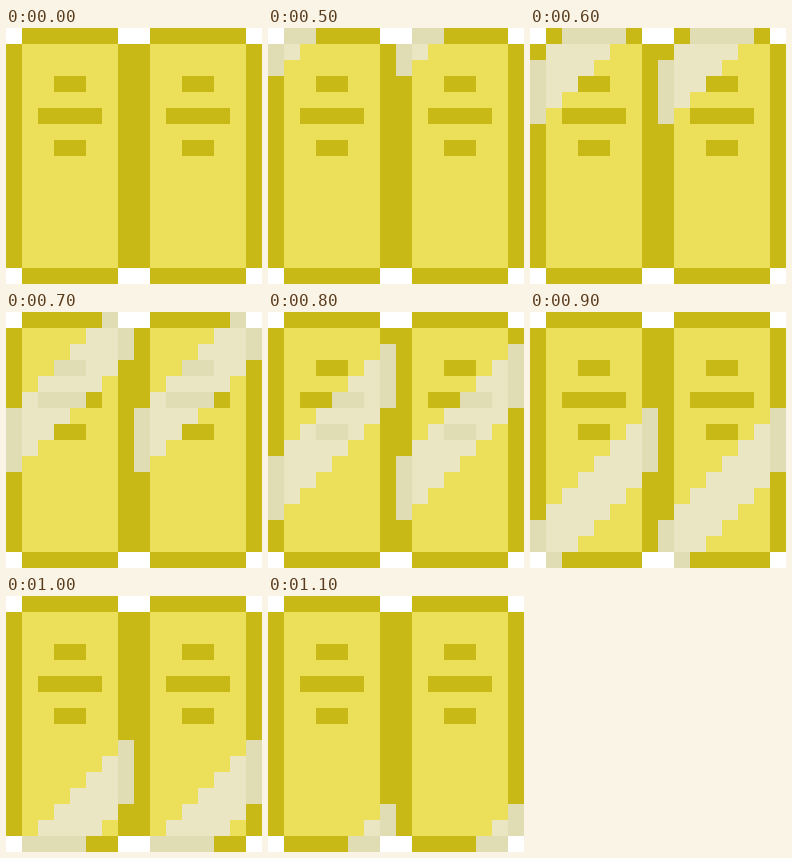
Write an HTML page that moves like this. It is 256x256 px and loops after 1200 ms.

```html
<!DOCTYPE html>
<html lang="en">
<head>
<meta charset="utf-8">
<title>Shining panels</title>
<style>
  html, body { margin: 0; width: 100%; height: 100%; overflow: hidden; background: #fff; }
  svg { display: block; width: 100%; height: 100%; }
</style>
</head>
<body>
<svg viewBox="0 0 16 16" shape-rendering="crispEdges">
  <defs>
    <g id="panel">
      <path id="edge" fill="#c8b917" d="M1 0h6v1h1v14h-1v1h-6v-1h-1v-14h1z"/>
      <path fill="#ece05a" d="M1 1h6v14h-6z"/>
      <path fill="#c8b917" d="M3 3h2v1h-2zM2 5h4v1h-4zM3 7h2v1h-2z"/>
      <path id="shineDark" fill="#e0ddb5"/>
      <path id="shineLight" fill="#eae6c4"/>
    </g>
  </defs>
  <use href="#panel"/>
  <use href="#panel" x="8"/>
</svg>
<script>
const LOOP = 1200, REST = 500, STEP = 100;
const BAND = 4, SPEED = 3.5;
const shineDark = document.getElementById('shineDark');
const shineLight = document.getElementById('shineLight');

const isCorner = (x, y) => (x === 0 || x === 7) && (y === 0 || y === 15);
const isEdge = (x, y) => x === 0 || x === 7 || y === 0 || y === 15;
const isSlot = (x, y) =>
  ((y === 3 || y === 7) && (x === 3 || x === 4)) || (y === 5 && x > 1 && x < 6);

// Diagonal band of cells whose x + y lies in [start, start + BAND)
function drawShine(start) {
  let dark = '', light = '';
  for (let y = 0; y < 16; y++) {
    for (let x = 0; x < 8; x++) {
      const d = x + y - start;
      if (d < 0 || d >= BAND || isCorner(x, y)) continue;
      const cell = `M${x} ${y}h1v1h-1z`;
      if (isEdge(x, y) || isSlot(x, y)) dark += cell;
      else light += cell;
    }
  }
  shineDark.setAttribute('d', dark);
  shineLight.setAttribute('d', light);
}

function render(ms) {
  const t = ms % LOOP;
  const step = Math.floor((t - REST) / STEP);
  drawShine(step < 0 ? -BAND : Math.floor(step * SPEED) - 1);
}

const begin = performance.now();
function tick() {
  render(performance.now() - begin);
  requestAnimationFrame(tick);
}
tick();
</script>
</body>
</html>
```
